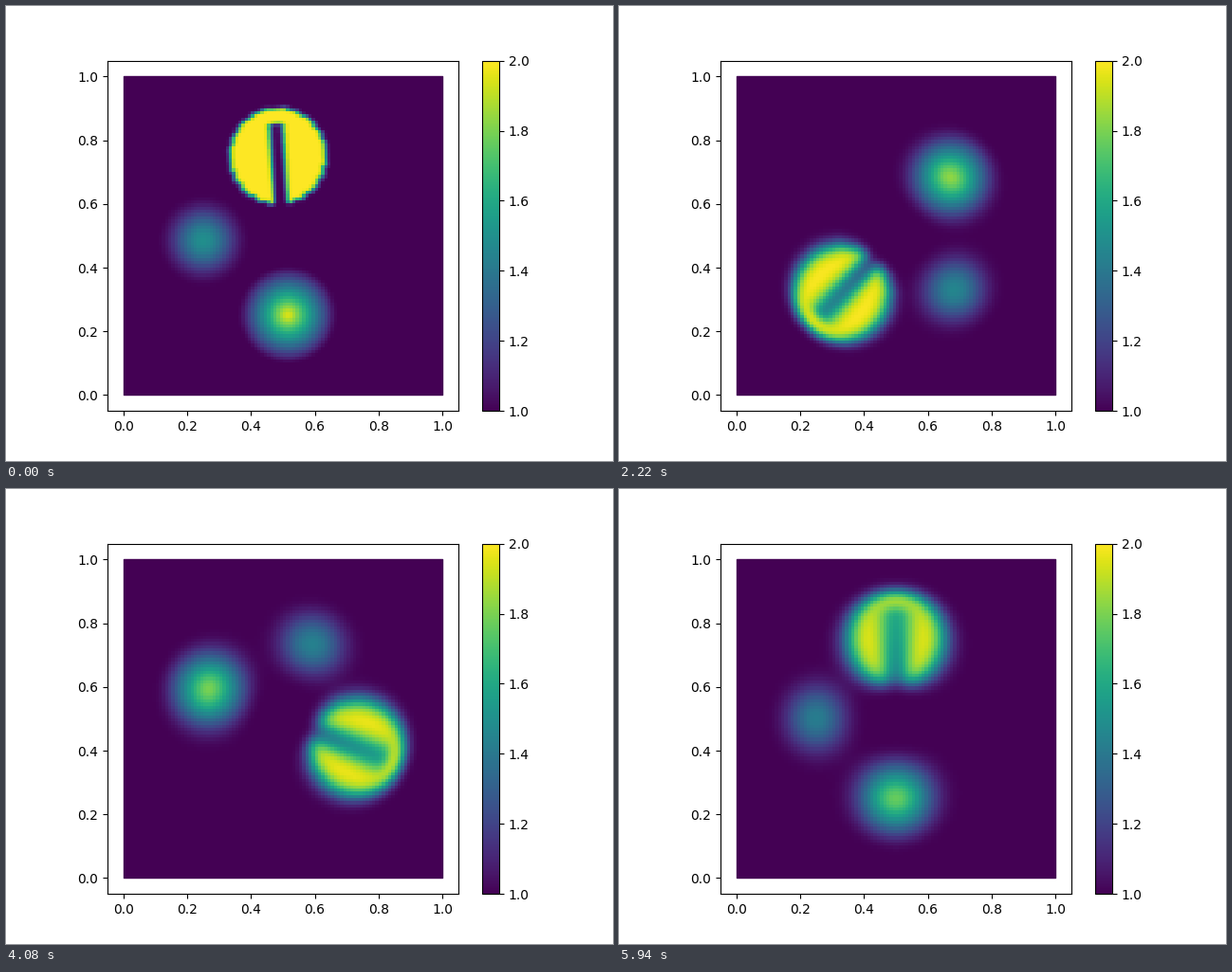
These frames come from a looping animation (640 by 480 pixels, 6 s). A matplotlib script:

```python
import numpy as np
import matplotlib.pyplot as plt
from matplotlib.animation import FuncAnimation
from matplotlib.patches import Rectangle

FRAMES = 100
CELLS = 100
RADIUS = 0.15          # size of each body
SPREAD_ALONG = 0.035   # smearing along the flow after one turn
SPREAD_ACROSS = 0.019  # smearing across the flow after one turn

# Polar grid around the centre of rotation
N_R, N_PHI, DR = 240, 900, 0.003
radii = (np.arange(N_R) + 0.5) * DR
angles = np.arange(N_PHI) * 2 * np.pi / N_PHI


def initial_state(x, y):
    """Slotted cylinder, cone and smooth hump on a background of one."""
    def dist(cx, cy):
        return np.minimum(np.hypot(x - cx, y - cy) / RADIUS, 1)

    solid = (np.abs(x - 0.5) >= 0.025) | (y >= 0.85)
    cylinder = (dist(0.5, 0.75) < 1) & solid
    cone = 1 - dist(0.5, 0.25)
    hump = 0.25 * (1 + np.cos(np.pi * dist(0.25, 0.5)))
    return 1 + cylinder + cone + hump


def snap(v):
    return (np.floor(v * CELLS) + 0.5) / CELLS


start = initial_state(snap(0.5 + radii[:, None] * np.cos(angles)),
                      snap(0.5 + radii[:, None] * np.sin(angles)))
spectrum = np.fft.rfft(start, axis=1)
modes = np.arange(spectrum.shape[1])
angle_spread = SPREAD_ALONG * np.cbrt(radii / 0.25) / radii
decay = (modes * angle_spread[:, None]) ** 2 / 2
gap2 = (radii[:, None] - radii) ** 2

# Cartesian cell centres in polar form
centres = (np.arange(CELLS) + 0.5) / CELLS - 0.5
gx, gy = np.meshgrid(centres, centres)
row = np.clip(np.hypot(gx, gy) / DR - 0.5, 0, N_R - 2)
row0 = row.astype(int)
row_w = row - row0
phi = np.arctan2(gy, gx)


def field(turn):
    """State after the given fraction of a full turn."""
    growth = np.cbrt(turn)
    smeared = np.fft.irfft(spectrum * np.exp(-decay * growth ** 2), N_PHI, axis=1)
    kernel = np.exp(-gap2 / (2 * (SPREAD_ACROSS * growth) ** 2))
    smeared = kernel @ smeared / kernel.sum(axis=1, keepdims=True)

    col = (phi / (2 * np.pi) - turn) * N_PHI
    col0 = np.floor(col).astype(int)
    col_w = col - col0
    a, b = col0 % N_PHI, (col0 + 1) % N_PHI
    inner = smeared[row0, a] * (1 - col_w) + smeared[row0, b] * col_w
    outer = smeared[row0 + 1, a] * (1 - col_w) + smeared[row0 + 1, b] * col_w
    return np.clip(inner * (1 - row_w) + outer * row_w, 1, 2)


fig, ax = plt.subplots(figsize=(6.4, 4.8), dpi=100)
floor_colour = plt.get_cmap("viridis")(0.0)
ax.add_patch(Rectangle((0, 0), 1, 1, facecolor=floor_colour,
                       edgecolor=floor_colour, linewidth=1,
                       joinstyle="round", zorder=1))
image = ax.imshow(field(1 / FRAMES), extent=(0, 1, 0, 1), origin="lower",
                  cmap="viridis", vmin=1, vmax=2, interpolation="nearest",
                  zorder=2)
ax.set(xlim=(-0.05, 1.05), ylim=(-0.05, 1.05), aspect="equal")
fig.colorbar(image, ax=ax)


def update(frame):
    image.set_data(field((frame + 1) / FRAMES))
    return [image]


anim = FuncAnimation(fig, update, frames=FRAMES, interval=60,
                     repeat=True, repeat_delay=0, blit=False)
plt.show()
```
